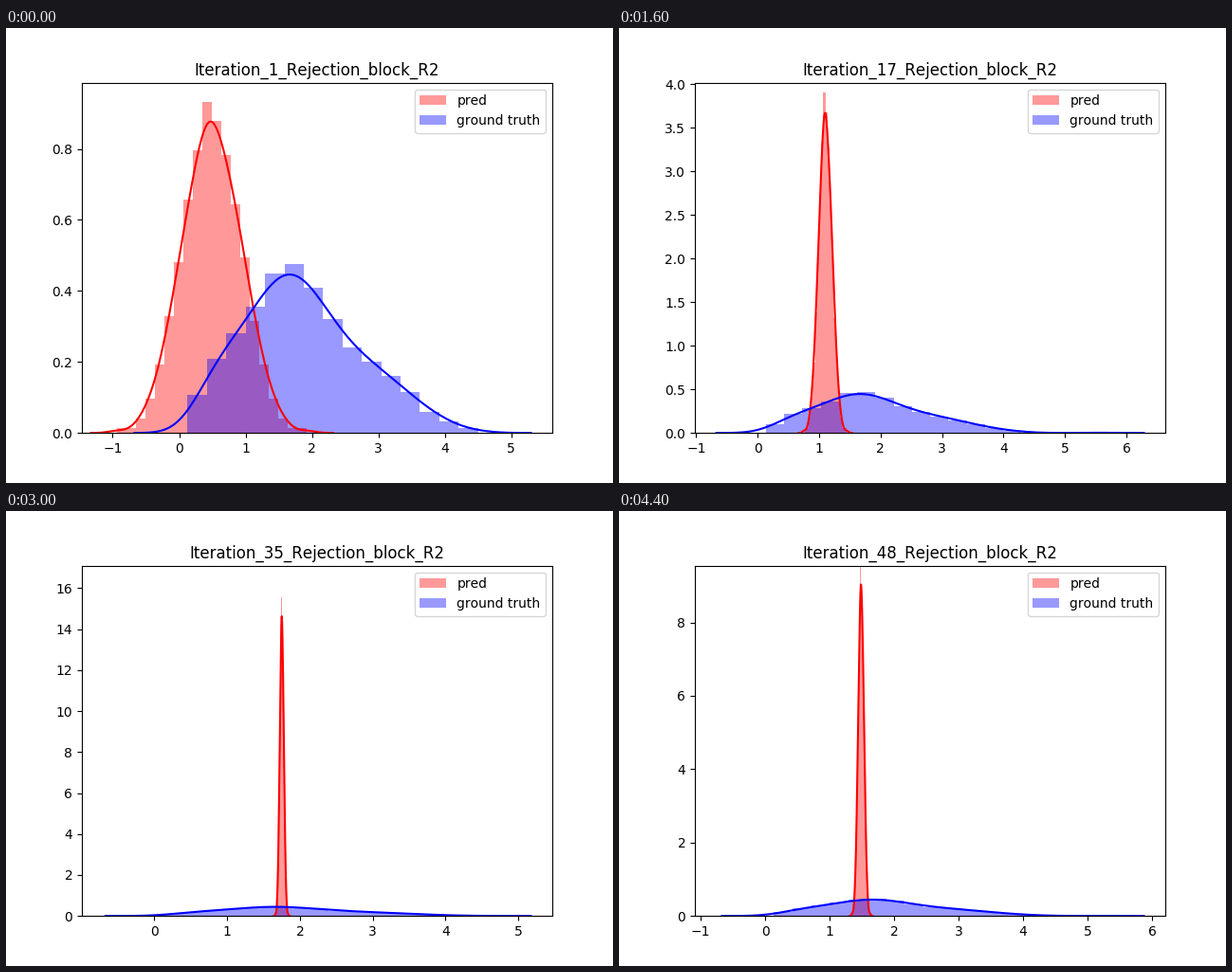
These frames come from a looping animation (640 px wide and 480 px high, 4600 ms). A matplotlib script:

```python
import numpy as np
import matplotlib.pyplot as plt
from matplotlib.animation import FuncAnimation

plt.rcParams["font.family"] = "DejaVu Sans"
plt.rcParams["text.kerning_factor"] = 6
SAMPLES = 512
TRUTH_START = -0.67

# Odd iterations with two gaps, then the last one
ITERATIONS = [i for i in range(1, 48, 2) if i not in (25, 29)] + [48]

# iteration: y limit, prediction peak height, its x, left and right curve ends
KEYS = {
    1: (0.9867, 0.877, 0.48, -1.1417, 5.295),
    5: (11.816, 9.76, 2.543, -0.657, 5.638),
    17: (4.017, 3.67, 1.099, -0.672, 6.284),
    27: (19.32, 15.3, 1.972, -0.763, 5.283),
    35: (17.1, 14.63, 1.751, -0.7, 5.172),
    43: (17.61, 14.61, 1.854, -0.622, 5.489),
    48: (9.55, 9.036, 1.488, -0.757, 5.875),
}


def values_at(iteration):
    """Interpolate the keys; heights change geometrically."""
    columns = zip(*KEYS.values())
    top, height, x, lo, hi = (
        np.exp(np.interp(iteration, list(KEYS), np.log(c))) if k < 2
        else np.interp(iteration, list(KEYS), c)
        for k, c in enumerate(columns))
    return top, height, x, lo, hi


def gauss(x, mean, sd):
    return np.exp(-((x - mean) / sd) ** 2 / 2) / (sd * np.sqrt(2 * np.pi))


def pred_shape(z):
    bell = np.exp(-np.abs(z) ** 2.2 / 2)
    return bell + 0.12 * np.exp(-((z + 0.1) / 0.18) ** 2 / 2)


def truth_shape(x):
    return (0.10 * gauss(x, 0.6, 0.3) + 0.62 * gauss(x, 1.6, 0.55)
            + 0.28 * gauss(x, 2.85, 0.65))


def spread(shape, lo, hi):
    """Even quantiles of a density cut off at lo and hi."""
    x = np.linspace(lo, hi, 2000)
    cdf = np.cumsum(shape(x))
    data = np.interp((np.arange(SAMPLES) + 0.5) / SAMPLES, cdf / cdf[-1], x)
    data[0], data[-1] = lo, hi
    return data


def bandwidth(data):
    """Scott's rule with the robust spread."""
    q1, q3 = np.percentile(data, [25, 75])
    width = min(data.std(ddof=1), (q3 - q1) / 1.349)
    return 1.059 * width * len(data) ** -0.2


def density(data):
    bw = bandwidth(data)
    x = np.linspace(data[0] - 3 * bw, data[-1] + 3 * bw, 128)
    return x, gauss(x[:, None], data, bw).mean(axis=1)


def fit_peak(data, top_x, top_y):
    """Scale samples so the density curve peaks at (top_x, top_y)."""
    x, y = density(data)
    k = y.argmax()
    return top_x + (data - x[k]) * y[k] / top_y


def fit_span(data, lo, hi):
    """Scale samples so the density curve runs from lo to hi."""
    x, _ = density(data)
    return lo + (data - x[0]) * (hi - lo) / (x[-1] - x[0])


PRED = spread(pred_shape, -3, 3)

fig, ax = plt.subplots(figsize=(6.4, 4.8), dpi=100)


def plot(data, color, label):
    bins = round((data[-1] - data[0]) / (1.075 * bandwidth(data)))
    ax.hist(data, bins=bins, density=True, color=color, alpha=0.4, label=label)
    ax.plot(*density(data), color=color, lw=1.5)


def draw(i):
    iteration = ITERATIONS[i]
    top, height, x, lo, hi = values_at(iteration)
    start = max(lo, TRUTH_START)
    truth = spread(truth_shape, start + 0.81, hi - 0.81)
    ax.clear()
    plot(fit_peak(PRED, x, height), "red", "pred")
    plot(fit_span(truth, start, hi), "blue", "ground truth")
    margin = 0.05 * (hi - lo)
    ax.set_xlim(lo - margin, hi + margin)
    ax.set_ylim(0, top)
    ax.set_title(f"Iteration_{iteration}_Rejection_block_R2")
    ax.legend(loc="upper right")


anim = FuncAnimation(fig, draw, frames=len(ITERATIONS), interval=200,
                     init_func=lambda: draw(0), repeat=True, repeat_delay=0)
plt.show()
```
